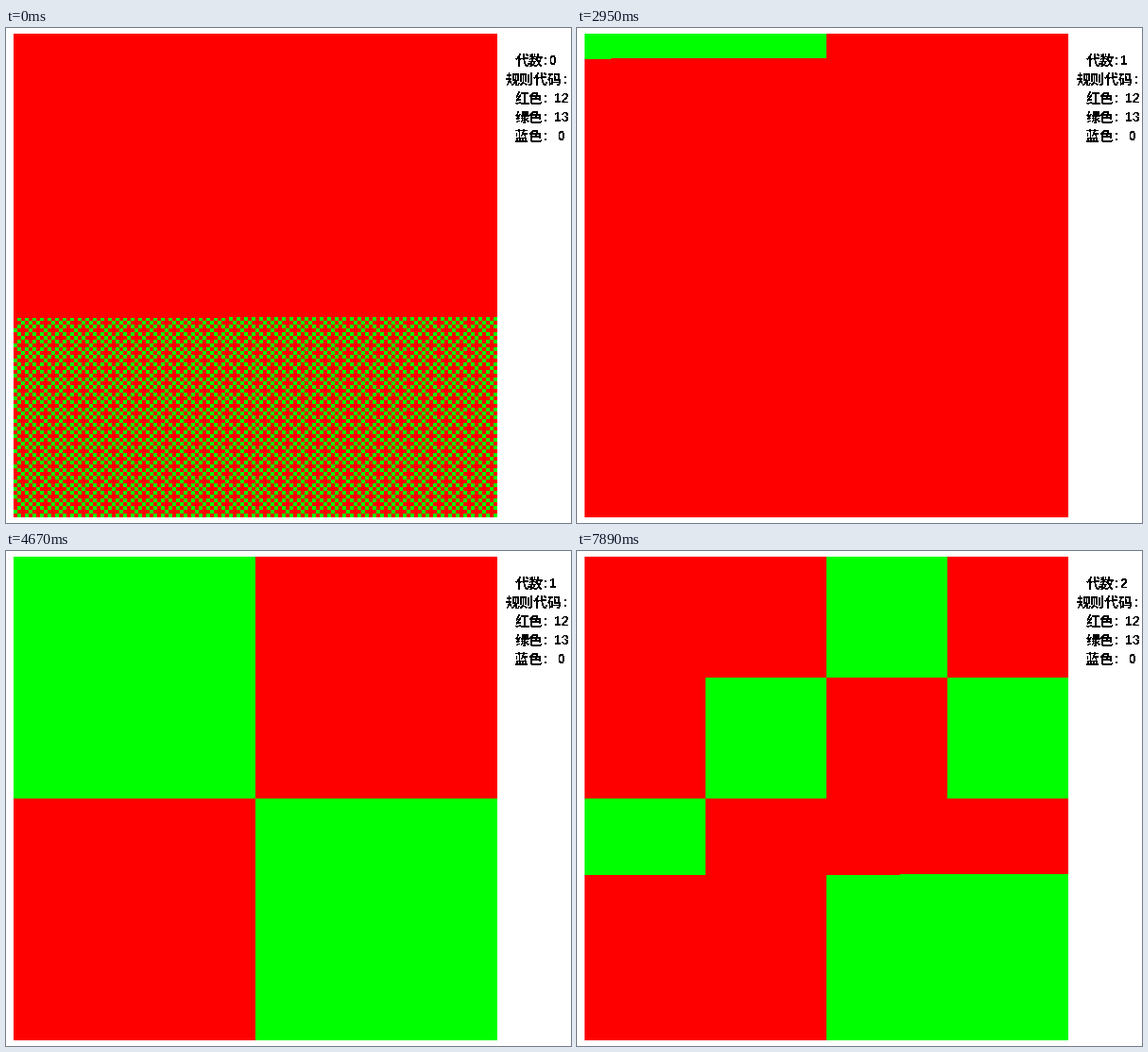
These frames come from a looping animation (598x524 px, 8 s). A matplotlib script:

```python
import numpy as np
import matplotlib.pyplot as plt
from matplotlib.animation import FuncAnimation
from matplotlib.transforms import IdentityTransform

W, H, DPI = 598, 524, 64
LEFT, TOP, SIDE = 8, 6, 512
LOOP, STEP = 8000, 20

GREEN, RED, BLUE = range(3)
COLORS = np.uint8(255) * np.eye(3, dtype=np.uint8)[[1, 0, 2]]
CODES = {RED: 12, GREEN: 13, BLUE: 0}
NAMES = {RED: "红色", GREEN: "绿色", BLUE: "蓝色"}

# The base-3 digits of a code, lowest first, are the four children of a cell.
RULES = np.array([[CODES[c] // 3 ** k % 3 for k in range(4)]
                  for c in (GREEN, RED, BLUE)]).reshape(3, 2, 2)


def generation(n):
    """Board after n substitutions, scaled up to SIDE x SIDE colours."""
    cells = np.array([[RED]])
    for _ in range(n):
        size = 2 * len(cells)
        cells = RULES[cells].transpose(0, 2, 1, 3).reshape(size, size)
    scale = SIDE // len(cells)
    return COLORS[cells.repeat(scale, 0).repeat(scale, 1)]


class Sweep:
    """Repaints the board pixel by pixel, shown in evenly timed ticks."""

    order = np.arange(SIDE * SIDE).reshape(SIDE, SIDE, 1)

    def __init__(self, old, new, start, end, ticks, first_pixel, rows):
        self.old, self.new = generation(old), generation(new)
        self.number = str(new)
        self.start, self.tick = start, (end - start) / ticks
        self.ticks, self.first_pixel, self.rows = ticks, first_pixel, rows

    def board(self, t):
        k = min(int((t - self.start) / self.tick), self.ticks)
        painted = self.first_pixel + k * self.rows * SIDE
        return np.where(self.order < painted, self.new, self.old)


sweeps = [
    Sweep(7, 0, 0, 850, 6, 300 * SIDE + 228, 38.4),
    Sweep(0, 1, 2950, 4670, 12, 26 * SIDE + 28, 41),
    Sweep(1, 2, 6790, 7890, 8, 17 * SIDE + 231, 39.9),
]

plt.rcParams["text.antialiased"] = False
fig = plt.figure(figsize=(W / DPI, H / DPI), dpi=DPI, facecolor="white")
stage = np.full((H, W, 3), 255, dtype=np.uint8)
picture = fig.figimage(stage, 0, 0, origin="upper")


def label(x, line, text, font, px, drop=0, ha="left"):
    return fig.text(x, H - 39 - 20 * line - drop, text, family=font,
                    weight="bold", size=px * 72 / DPI, color="black",
                    ha=ha, va="baseline", transform=IdentityTransform())


def hanzi(x, line, text):
    return label(x, line, text, "Noto Sans CJK JP", 15, drop=1)


def digits(x, line, text, ha="left"):
    return label(x, line, text, "Liberation Sans", 14, ha=ha)


hanzi(538.5, 0, "代数")
digits(569, 0, ":")
counter = digits(575.5, 0, "0")
hanzi(528.5, 1, "规则代码")
digits(589.5, 1, ":")
for line, (color, code) in enumerate(CODES.items(), start=2):
    hanzi(538.5, line, NAMES[color])
    digits(569, line, ":")
    digits(588, line, str(code), ha="center")


def update(i):
    t = i * STEP + STEP / 2
    sweep = [s for s in sweeps if s.start <= t][-1]
    frame = stage.copy()
    frame[TOP:TOP + SIDE, LEFT:LEFT + SIDE] = sweep.board(t)
    picture.set_data(frame)
    counter.set_text(sweep.number)
    return picture, counter


anim = FuncAnimation(fig, update, frames=LOOP // STEP, interval=STEP,
                     init_func=lambda: update(0), repeat=True,
                     repeat_delay=0, blit=False)
plt.show()
```
